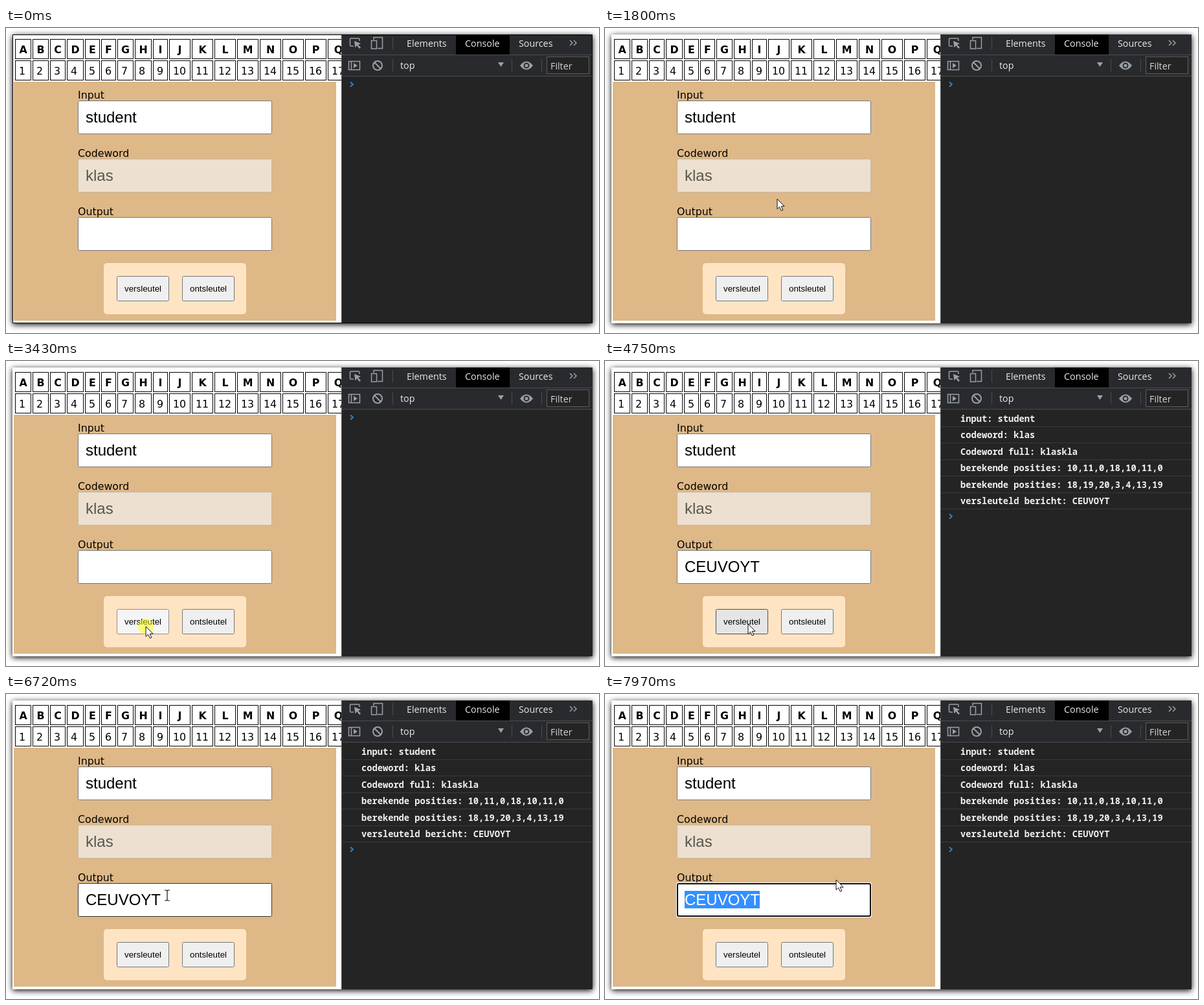
Write an HTML page that moves like this. It is 916 px wide and 471 px high and loops after 8 s.

```html
<!DOCTYPE html>
<html lang="nl">
<head>
<meta charset="utf-8">
<title>Versleutelen</title>
<style>
  html, body { margin: 0; width: 100%; height: 100%; overflow: hidden; background: #fff; }
  svg { display: block; }
  text { white-space: pre; }
  .page { font: 15.8px "DejaVu Sans", sans-serif; }
  .head { font-weight: bold; text-anchor: middle; }
  .field { font: 24px "Liberation Sans", Arial, sans-serif; }
  .label { font: 13.33px "Liberation Sans", Arial, sans-serif; }
  .tools { font: 14.3px "Open Sans", sans-serif; fill: #e8eaed; }
  .log { font: bold 13.73px "Noto Sans Mono", monospace; fill: #f0f0f0; }
  .icon { fill: none; stroke: #9aa0a6; stroke-width: 1.5; }
  .icon .solid { fill: #9aa0a6; stroke: none; }
  .box { fill: #fff; stroke: #767676; }
  .box.hover { stroke: #333; }
  .box.disabled { fill: #ede0d0; stroke: #c5b8a4; }
  .disabled + text { fill: #575750; }
  .button { fill: #efefef; stroke: #767676; }
  .button.hover { fill: #e5e5e5; stroke: #4f4f4f; }
  .button.active { fill: #f5f5f5; stroke: #8d8d8d; }
</style>
</head>
<body>
<svg width="916" height="471" viewBox="0 0 916 471">
  <rect x="10" y="10" width="896" height="446" fill="#fff" style="filter:drop-shadow(0 2px 5px #000)"/>
  <g id="table" class="page"></g>
  <rect x="12" y="83" width="498" height="369" fill="#deb887"/>
  <g id="fields"></g>

  <g class="field">
    <g id="focus">
      <rect x="110" y="291" width="302" height="54" rx="3" fill="#fff"/>
      <rect x="112" y="293" width="298" height="50" rx="2" fill="#fff" stroke="#101010" stroke-width="2"/>
    </g>
    <text id="result" x="123" y="326">CEUVOYT</text>
    <clipPath id="clip"><rect id="range" y="304" width="200" height="27"/></clipPath>
    <g id="selection" clip-path="url(#clip)">
      <rect x="123" y="304" width="116" height="27" fill="#3390ff"/>
      <text x="123" y="326" fill="#fff">CEUVOYT</text>
    </g>
  </g>

  <rect x="151" y="363" width="220" height="79" rx="5" fill="#ffe4c4"/>
  <g id="buttons" class="label"></g>

  <rect x="518" y="10" width="388" height="446" fill="#242424"/>
  <rect x="518" y="10" width="388" height="64" fill="#292a2d"/>
  <rect x="695" y="10" width="83" height="31" fill="#000"/>
  <path d="M518 41.5H906M518 74.5H906M597.5 14V33M597.5 48V67M781.5 48V67M827.5 48V67M518.5 10V456" stroke="#4a4c50"/>
  <g class="icon">
    <path d="M537 28H533Q531.5 28 531.5 26.5V17.5Q531.5 16 533 16H544.5Q546 16 546 17.5V20"/>
    <path class="solid" d="M538 20L548 24 544 26 548 30 546 32 542 27 539.5 30.5Z"/>
    <path d="M568 18V14.5H581.5V31.5H574M564.5 19.5H572.5V32H564.5Z"/>
    <path d="M529.5 51.5H546.5V64.5H529.5ZM533.5 51V65"/>
    <path class="solid" d="M537 54L543 58 537 62Z"/>
    <circle cx="574" cy="58" r="7" stroke-width="2"/>
    <path d="M569 53L579 63" stroke-width="2"/>
    <path class="solid" d="M760 53H769L764.5 60Z"/>
    <path class="solid" d="M794 58Q804 45 814 58 804 71 794 58Z"/>
    <circle cx="804" cy="58" r="3.5" fill="#9aa0a6" stroke="#292a2d" stroke-width="2"/>
    <path d="M871 19L875 23 871 27M877 19L881 23 877 27"/>
  </g>
  <rect x="835.5" y="44.5" width="65" height="26" fill="#242424" stroke="#5a5d61"/>
  <g class="tools">
    <text x="619" y="29">Elements</text>
    <text x="709" y="29">Console</text>
    <text x="792" y="29">Sources</text>
    <text x="609" y="63">top</text>
    <text x="841" y="64" fill="#d2d4d7">Filter</text>
  </g>
  <g id="log" class="log"></g>
  <path id="prompt" d="M532 83.500L536 87 532 90.500" fill="none" stroke="#2f8ad6" stroke-width="1.700"/>

  <rect id="edge" x="10.5" y="10.5" width="895" height="445" fill="none" stroke="#000"/>
  <circle id="press" r="12" fill="#ffff00" opacity=".5"/>
  <path id="arrow" d="M0 0V15.500L3.500 12.200 6.300 18 8.800 17 6.200 11.300H11Z" fill="#fff" stroke="#111"/>
  <path id="beam" d="M-4 -8H-1L0 -7 1 -8H4M0 -7V7M-4 8H-1L0 7 1 8H4" fill="none" stroke="#111" stroke-width="1.200"/>
</svg>
<script>
const $ = id => document.getElementById(id);
const show = (id, on) => $(id).style.display = on ? '' : 'none';
const fill = (id, items, html) => $(id).innerHTML = items.map(html).join('');
const LOOP = 8000, CLICK = 3430, ANSWER = 3590, DRAG = 7040, RELEASE = 7590, STEP = 77;

// Columns are as wide as their widest text, rounded up, plus padding and border
const pen = document.createElement('canvas').getContext('2d');
const measure = (text, weight) => {
  pen.font = `${weight} 15.8px "DejaVu Sans", sans-serif`;
  return pen.measureText(text).width;
};
let left = 14;
fill('table', [...'ABCDEFGHIJKLMNOPQ'], (letter, i) => {
  const x = left, w = Math.ceil(Math.max(measure(letter, 'bold'), measure(i + 1, 'normal'))) + 12;
  left += w + 2;
  const cell = y => `<rect x="${x + .5}" y="${y}" width="${w - 1}" height="30" fill="#fff" stroke="#000"/>`;
  return cell(17.5) + cell(50.5) +
    `<text class="head" x="${x + w / 2}" y="39">${letter}</text><text x="${x + 6}" y="72">${i + 1}</text>`;
});

fill('fields', [['Input', 'student'], ['Codeword', 'klas', 'disabled'], ['Output', '']], ([name, value, state], i) => {
  const y = 109 + 90 * i;
  return `<text class="page" x="111" y="${y}">${name}</text>
    <rect id="${name}" class="box ${state || ''}" x="111.5" y="${y + 3.5}" width="299" height="51" rx="2"/>
    <text class="field" x="123" y="${y + 37}">${value}</text>`;
});

fill('buttons', ['versleutel', 'ontsleutel'], (name, i) => {
  const x = 171 + 101 * i;
  return `<rect id="${name}" class="button" x="${x + .5}" y="383.5" width="80" height="38" rx="2"/>
    <text x="${x + 12}" y="407">${name}</text>`;
});

fill('log', [
  'input: student', 'codeword: klas', 'Codeword full: klaskla',
  'berekende posities: 10,11,0,18,10,11,0', 'berekende posities: 18,19,20,3,4,13,19',
  'versleuteld bericht: CEUVOYT'
], (line, i) => {
  const y = Math.round(94 + i * 25.4);
  return `<text x="549" y="${y}">${line}</text><path d="M519 ${y + 7.5}H906" stroke="#3a3a3a"/>`;
});

// Pointer moves: start, end, from, to
const moves = [
  [1260, 2060, [339, 442], [241, 203]],
  [2200, 2970, [241, 203], [223, 402]],
  [3050, 3130, [219, 406], [216, 410]],
  [4750, 5450, [221, 406], [580, 189]],
  [5780, 6560, [575, 195], [203, 322]],
  [6640, 6870, [247, 311], [260, 312]],
  [DRAG, 7430, [256, 313], [84, 317]],
  [RELEASE, 7820, [88, 316], [238, 308]],
  [7890, 7970, [300, 297], [357, 287]]
];
const ease = p => p < .5 ? 4 * p ** 3 : 1 - 4 * (1 - p) ** 3;

function pointer(t) {
  const move = moves.findLast(m => m[0] <= t);
  if (!move) return null;
  const [start, end, from, to] = move;
  const steps = Math.round((end - start) / STEP);
  const p = Math.min(1, Math.floor((t - start) / (end - start) * steps + .01) / steps);
  return from.map((v, k) => Math.round(v + (to[k] - v) * ease(p)));
}

const inside = (at, x, y, w, h) => !!at && at[0] >= x && at[0] < x + w && at[1] >= y && at[1] < y + h;

// Left edge of the first character whose middle lies right of x
function selectionStart(x) {
  const text = $('result');
  for (let i = 0; i < text.getNumberOfChars(); i++) {
    const a = text.getStartPositionOfChar(i).x, b = text.getEndPositionOfChar(i).x;
    if (x < (a + b) / 2) return a;
  }
  return 239;
}

function draw(t) {
  const at = pointer(t);
  const done = t >= ANSWER, selecting = t >= DRAG;
  const clicking = t >= CLICK && !done, dragging = selecting && t < RELEASE;
  const overOutput = inside(at, 111, 292, 300, 52);
  const beam = overOutput || dragging;

  show('edge', t < 70);
  show('result', done);
  show('log', done);
  $('prompt').setAttribute('transform', `translate(0 ${done ? 153 : 0})`);
  $('Output').classList.toggle('hover', overOutput);
  $('versleutel').classList.toggle('hover', inside(at, 171, 383, 81, 39));
  $('versleutel').classList.toggle('active', clicking);
  $('ontsleutel').classList.toggle('hover', inside(at, 272, 383, 81, 39));
  show('focus', selecting);
  show('selection', selecting);
  if (selecting) $('range').setAttribute('x', selectionStart(dragging ? at[0] : 0));

  show('arrow', at && !beam);
  show('beam', beam);
  show('press', clicking || dragging);
  if (at) for (const id of ['arrow', 'beam', 'press']) $(id).setAttribute('transform', `translate(${at})`);
}

function tick() {
  draw(performance.now() % LOOP);
  requestAnimationFrame(tick);
}
tick();
</script>
</body>
</html>
```
